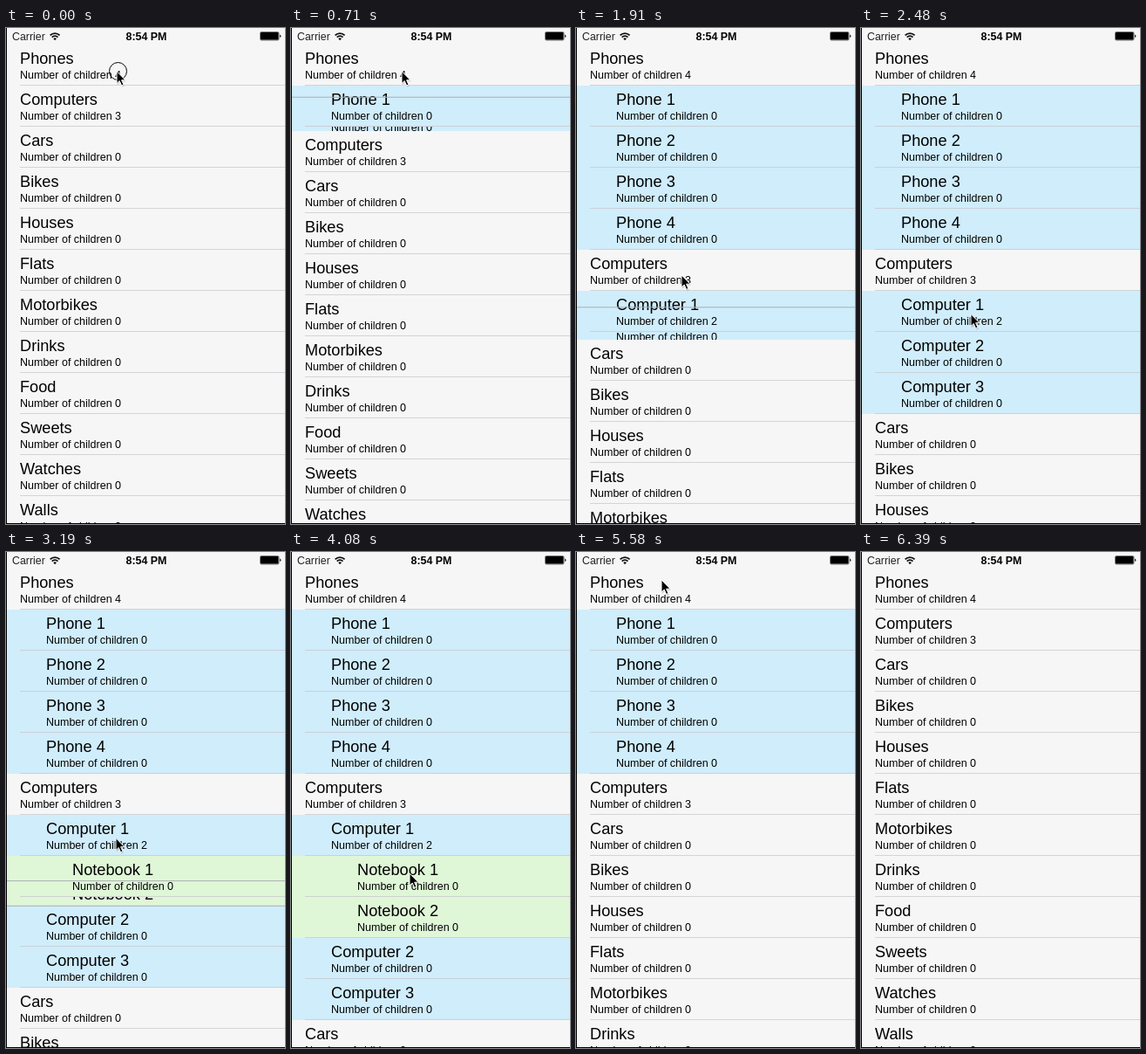
Write an HTML page that moves like this. It is 320 by 568 pixels and loops after 6840 ms.

```html
<!DOCTYPE html>
<html lang="en">
<head>
<meta charset="utf-8">
<title>Expanding list</title>
<style>
  html, body { margin: 0; width: 100%; height: 100%; overflow: hidden; background: #f6f6f6; }
  svg { display: block; width: 320px; height: 568px; font-family: "Liberation Sans", Arial, sans-serif; }
  .title { font-size: 18.2px; }
  .sub { font-size: 12.5px; }
  .bar { font-size: 12.4px; }
  .rule { fill: #c8c7cc; opacity: .75; }
  .line { fill: #a9afb3; }
</style>
</head>
<body>
<svg viewBox="0 0 320 568">
  <rect width="320" height="568" fill="#f6f6f6"/>
  <g id="rows"></g>
  <g id="lines"></g>
  <g>
    <rect width="320" height="19" fill="#f6f6f6"/>
    <text class="bar" x="7" y="14" fill="#222">Carrier</text>
    <g fill="none" stroke="#111" stroke-width="1.8">
      <path d="M50.6 8.4 a7.8 7.8 0 0 1 11 0"/>
      <path d="M52.7 10.6 a4.8 4.8 0 0 1 6.8 0"/>
    </g>
    <path d="M54.3 12.2 a2.6 2.6 0 0 1 3.6 0 L56.1 14.2 Z" fill="#111"/>
    <text class="bar" x="161" y="14" text-anchor="middle" font-weight="bold">8:54 PM</text>
    <rect x="291.5" y="4.5" width="21.5" height="9.5" rx="1.5" fill="none" stroke="#222" stroke-width=".6"/>
    <rect x="292" y="5" width="20.5" height="8.5" rx=".8"/>
    <path d="M314.2 7.5 a2 2 0 0 1 0 3.6 Z"/>
  </g>
  <path d="M0 0 H1 V567 H320 V568 H0 Z"/>
  <g id="pointer">
    <circle id="ring" cx="1.5" cy="0" r="10" fill="none" stroke="#000" stroke-width="1"/>
    <path d="M.8 1.8 V15.8 L4 12.8 L6.4 18 L8.8 17 L6.5 11.8 H10.8 Z" fill="#000" opacity=".18"/>
    <path d="M0 0 V14 L3.2 11 L5.6 16.4 L7.9 15.4 L5.6 10.2 H10 Z" stroke="#fff" stroke-width="1"/>
  </g>
</svg>
<script>
const LOOP = 6840, LEAVE = 6390, SLIDE = 300, ROW = 47, TOP = 19;
const COLORS = ['#f6f6f6', '#d0edfb', '#dff7d7'];

const numbered = (name, count) =>
  Array.from({ length: count }, (_, i) => ({ title: `${name} ${i + 1}` }));

// Nodes with children carry the times at which they open and close
const computers = numbered('Computer', 3);
Object.assign(computers[0], { children: numbered('Notebook', 2), open: 3019 });
const tree = [
  { title: 'Phones', children: numbered('Phone', 4), open: 606, close: 5945 },
  { title: 'Computers', children: computers, open: 1781, close: 4794 },
  ...'Cars Bikes Houses Flats Motorbikes Drinks Food Sweets Watches Walls'
    .split(' ').map(title => ({ title }))
];

function flatten(nodes, parent, depth = 0) {
  return nodes.flatMap(node => {
    Object.assign(node, { parent, depth });
    return [node, ...flatten(node.children || [], node, depth + 1)];
  });
}
const rows = flatten(tree);
const parents = rows.filter(row => row.children);
const taps = [30, ...parents.flatMap(row => [row.open, row.close])];

// Resting places of the pointer: [arrival, x, y]
const STOPS = [
  [0, 127, 49.5], [1500, 118, 301], [1735, 121, 283], [2480, 126, 327.5], [3840, 136, 368],
  [4430, 117, 296], [4640, 115, 289.5], [5580, 98, 32], [5830, 98, 37.5], [LEAVE, 285, 580]
];

const byId = id => document.getElementById(id);
function add(parent, tag, attrs, text = '') {
  const el = document.createElementNS(parent.namespaceURI, tag);
  for (const key in attrs) el.setAttribute(key, attrs[key]);
  el.textContent = text;
  return parent.appendChild(el);
}
const moveTo = (el, x, y) => el.setAttribute('transform', `translate(${x} ${y})`);
const show = (el, on) => el.setAttribute('visibility', on ? 'visible' : 'hidden');

// Shallow rows lie over deep ones, earlier rows over later ones
[...rows].reverse().sort((a, b) => b.depth - a.depth).forEach(row => {
  const x = 16 + 30 * row.depth, count = row.children ? row.children.length : 0;
  row.el = add(byId('rows'), 'g', {});
  add(row.el, 'rect', { width: 320, height: ROW, fill: COLORS[row.depth] });
  add(row.el, 'text', { class: 'title', x, y: 21.5 }, row.title);
  add(row.el, 'text', { class: 'sub', x, y: 39 }, 'Number of children ' + count);
  add(row.el, 'rect', { class: 'rule', x: 16, y: ROW - 1, width: 304, height: 1 });
});
const lines = numbered('line', 4).map(() =>
  add(byId('lines'), 'rect', { class: 'line', width: 320, height: 1 }));

function ease(x) {
  const k = Math.min(1, Math.max(0, x));
  return k * k * (3 - 2 * k);
}

const openness = (row, t) =>
  ease((t - row.open) / SLIDE) - ease((t - (row.close || Infinity)) / SLIDE);

const extent = ({ parent }, t) => parent ? openness(parent, t) * extent(parent, t) : 1;

// Longer ways take longer, up to a limit
function pointerAt(t) {
  const next = STOPS.findIndex(stop => stop[0] > t);
  if (next < 0) return STOPS[STOPS.length - 1].slice(1);
  const [, x0, y0] = STOPS[next - 1], [arrival, x1, y1] = STOPS[next];
  const travel = Math.min(400, 40 * Math.sqrt(Math.hypot(x1 - x0, y1 - y0)));
  const k = ease(1 - (arrival - t) / travel);
  return [x0 + (x1 - x0) * k, y0 + (y1 - y0) * k];
}

function drawRows(t) {
  let y = TOP;
  for (const row of rows) {
    row.y = Math.floor(y);
    moveTo(row.el, 0, row.y);
    y += ROW * extent(row, t);
  }
}

// Full-width lines ride on the rows that are sliding out
function drawLines(t) {
  const opening = parents.find(row => t > row.open && t < row.open + SLIDE);
  const children = opening ? opening.children : [];
  const step = opening ? ROW * openness(opening, t) : 0;
  lines.forEach((line, i) => {
    const on = i < children.length && (i === 0 || step > ROW / 2);
    show(line, on);
    if (on) line.setAttribute('y', children[0].y + (i + 1) * step - .5);
  });
}

function draw(t) {
  drawRows(t);
  drawLines(t);
  moveTo(byId('pointer'), ...pointerAt(t));
  show(byId('pointer'), t < LEAVE);
  show(byId('ring'), taps.some(tap => t >= tap - 125 && t < tap + 30));
}

const begin = performance.now();
function loop() {
  draw((performance.now() - begin) % LOOP);
  requestAnimationFrame(loop);
}
loop();
</script>
</body>
</html>
```
